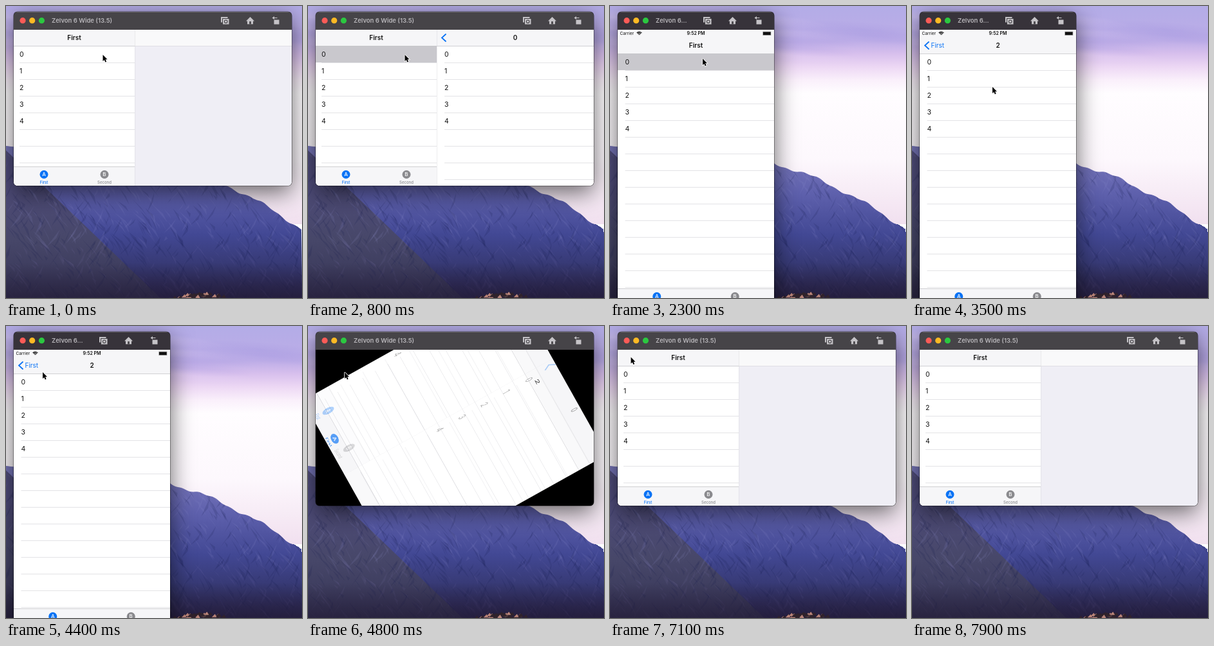
An HTML page with a canvas that plays this animation: 460x455 px, repeating every 8000 ms.

```html
<!DOCTYPE html>
<html lang="en">
<head>
<meta charset="utf-8">
<title>Split view rotation</title>
<style>
html, body { margin: 0; width: 100%; height: 100%; overflow: hidden; background: #fff; }
canvas { display: block; }
</style>
</head>
<body>
<canvas id="stage" width="460" height="455"></canvas>
<script>
const W = 460, H = 455, LOOP = 8000, STEP = 100, ROW = 26;
const TO_PORTRAIT = 1170, TO_LANDSCAPE = 4640, TURN = 420;
const TAP = { root: 200, row: 2700, back: 6100 };
// drift: how far bars and lists slide while the device turns
const LAND = { w: 432, h: 243, col: 188, nav: 25, titleY: 12.5, inset: 9, tabY: 213, drift: -6 };
const PORT = { w: 243, h: 432, col: 243, nav: 37, titleY: 24.5, inset: 11.5, tabY: 403, drift: 20 };
const INK = '#111', BLUE = '#0a73f5', GREY = '#8a8a8e', LINE = '#dcdce0', EDGE = '#c6c6ca', BAR = '#f6f6f8';
// pointer: [departure time, x, y]
const STOPS = [[0, 150.5, 76], [1900, 144, 82], [2400, 130, 132], [3150, 125, 126], [4000, 57, 72], [5700, 32.5, 48.5]];

let c = document.getElementById('stage').getContext('2d');

const mix = (a, b, p) => a + (b - a) * p;
const ease = v => { v = Math.max(0, Math.min(1, v)); return v * v * (3 - 2 * v); };

function box(x, y, w, h, color) {
  c.fillStyle = color;
  c.fillRect(x, y, w, h);
}

function text(s, x, y, size, color, align = 'left', weight = 400) {
  c.font = `${weight} ${size}px Inter, "Liberation Sans", sans-serif`;
  c.textAlign = align;
  c.textBaseline = 'middle';
  c.fillStyle = color;
  c.fillText(s, x, y + .5);
}

const title = (s, x, y) => text(s, x, y, 10, INK, 'center', 600);

function path(points) {
  c.beginPath();
  points.forEach(([x, y]) => c.lineTo(x, y));
}

function shape(points, color) {
  path(points);
  c.fillStyle = color;
  c.fill();
}

function ink(color, width) {
  c.strokeStyle = color;
  c.lineWidth = width;
  c.stroke();
}

function arc(x, y, r, from = 0, to = 7) {
  c.beginPath();
  c.arc(x, y, r, from, to);
}

function disc(x, y, r, color) {
  arc(x, y, r);
  c.fillStyle = color;
  c.fill();
}

function saved(draw) {
  c.save();
  draw();
  c.restore();
}

const faded = (alpha, draw) => saved(() => { c.globalAlpha *= alpha; draw(); });

function ramp(y0, y1, stops) {
  const g = c.createLinearGradient(0, y0, 0, y1);
  stops.forEach(([at, color]) => g.addColorStop(at, color));
  return g;
}

// Runs a drawing into its own canvas.
function layer(w, h, scale, draw) {
  const cv = document.createElement('canvas'), before = c;
  cv.width = w * scale;
  cv.height = h * scale;
  c = cv.getContext('2d');
  c.scale(scale, scale);
  draw();
  c = before;
  return cv;
}

// ---------- wallpaper ----------
function ridge(x) {
  if (x < 255) return 218 + x * .106;
  const d = x - 255;
  return 245 + d * .3 + d * d * .001 + 2.5 * Math.sin(d / 13) + Math.sin(d / 4);
}

function wallpaper() {
  let seed = 11;
  const rnd = () => (seed = seed * 16807 % 2147483647) / 2147483647;

  box(0, 0, W, 340, ramp(0, 340, [[0, '#b3ace7'], [.16, '#bdade7'], [.22, '#d8c0ed'],
    [.28, '#edd8f4'], [.34, '#faf0fb'], [.4, '#fffdff'], [.7, '#fdf8fd'], [1, '#f1e0ef']]));
  for (let i = 0; i < 18; i++) saved(() => {
    c.translate(rnd() * W, rnd() * 90);
    c.rotate(.08);
    c.scale(1, .1);
    const g = c.createRadialGradient(0, 0, 0, 0, 0, 120), rgb = i % 2 ? '240,222,248' : '152,140,220';
    g.addColorStop(0, `rgba(${rgb},.22)`);
    g.addColorStop(1, `rgba(${rgb},0)`);
    disc(0, 0, 120, g);
  });

  saved(() => {
    const outline = [[W, H], [0, H]];
    for (let x = 0; x <= W; x += 3) outline.push([x, ridge(x)]);
    path(outline);
    c.clip();
    box(0, 210, W, 245, ramp(235, H, [[0, '#7776ba'], [.25, '#5f61ad'], [.55, '#424894'], [.8, '#35376f'], [1, '#2a2650']]));
    shape([[0, 225], [110, 330], [240, H], [0, H]], ramp(270, H, [[0, '#504d7c'], [.5, '#474769'], [1, '#353455']]));
    // rock faces: slivers running down the slopes
    for (let i = 0; i < 900; i++) {
      const x = rnd() * W, y = 225 + rnd() * 230, len = 8 + rnd() * 30;
      const a = rnd() < .7 ? .75 + rnd() * .4 : 1.9 + rnd() * .4;
      const dx = Math.cos(a) * len, dy = Math.sin(a) * len, dark = rnd() < .55;
      shape([[x, y], [x + dx, y + dy], [x + dx * .5 + 1 + rnd() * 4, y + dy * .5]],
        dark ? 'rgba(24,26,74,.16)' : `rgba(150,146,208,${y < 360 ? .13 : .07})`);
    }
    box(0, 400, W, 55, ramp(400, H, [[0, 'rgba(34,26,52,0)'], [1, 'rgba(34,26,52,.65)']]));
  });

  for (let i = 0; i < 60; i++) {
    const x = 260 + rnd() * 82, y = 446 + Math.abs(x - 302) * .14 + rnd() * 7;
    shape([[x - 3, y + 3], [x + 2, y - 2], [x + 5, y + 3]], i % 3 ? '#30232c' : '#b98478');
  }
}

// ---------- app screens ----------
function chevron(y) {
  c.lineCap = 'round';
  path([[14, y - 5.5], [8, y], [14, y + 5.5]]);
  ink(BLUE, 1.8);
}

function list(x, w, m, inset, selected = -1) {
  box(x, 0, w, m.h, '#fff');
  if (selected >= 0) box(x, m.nav + selected * ROW, w, ROW, '#c9c8cd');
  for (let y = m.nav + ROW; y < m.h; y += ROW) box(x + inset, y, w - inset, .8, LINE);
  for (let i = 0; i < 5; i++) text(i, x + inset, m.nav + (i + .5) * ROW, 10.5, INK);
}

function navBar(w, m) {
  box(0, -30, w, m.nav + 30, BAR);
  box(0, m.nav, w, .8, EDGE);
}

function statusBar() {
  text('Carrier', 3.5, 5.5, 6.6, INK);
  text('9:52 PM', 121.5, 5.5, 7, INK, 'center', 600);
  for (let r = 1.4; r < 6; r += 1.9) {
    arc(33.5, 8.5, r, -2.4, -.74);
    ink(INK, 1.2);
  }
  box(225.3, 2.8, 13, 6, '#999');
  box(226, 3.5, 11.6, 4.6, INK);
}

function tab(x, y, letter, label, color) {
  disc(x, y, 6.5, color);
  text(letter, x, y, 8, '#fff', 'center', 500);
  text(label, x, y + 12, 6, color, 'center', 500);
}

// push: 0 shows the root list, 1 the pushed one
function master(m, push, selected, pressed, drift) {
  const w = m.col, y = m.titleY;
  c.beginPath();
  c.rect(0, 0, w, m.h);
  c.clip();
  saved(() => {
    c.translate(0, drift);
    list(-.3 * push * w, w, m, m.inset, selected);
    if (push > 0) {
      box((1 - push) * w - 1, 0, 1, m.h, LINE);
      list((1 - push) * w, w, m, m.inset);
    }
    navBar(w, m);
    faded(1 - push, () => title('First', w / 2 - push * w * .35, y));
    faded(push, () => title('2', w * (1 - push / 2), y));
    faded(pressed ? push * .1 : push, () => {
      chevron(y);
      if (m === PORT) text('First', 17.5 + (1 - push) * 60, y, 10, BLUE);
    });
  });
  box(0, m.tabY, w, m.h - m.tabY, BAR);
  box(0, m.tabY, w, .8, EDGE);
  tab(w / 4, m.tabY + 12.5, 'A', 'First', BLUE);
  tab(w * 3 / 4, m.tabY + 12.5, 'B', 'Second', GREY);
}

function detail(m, filled, drift) {
  const w = m.w - m.col;
  c.translate(m.col, drift);
  if (filled) {
    list(0, w, m, 12);
    navBar(w, m);
    chevron(m.titleY);
    title('0', w / 2, m.titleY);
  } else {
    box(0, 0, w, m.h, '#efeef5');
    box(0, 0, w, m.nav, '#f9f9fa');
    box(0, m.nav, w, .8, LINE);
  }
  box(-.4, 0, .8, m.h, '#d2d2d6');
}

function screen(m, t, drift = 0) {
  const push = ease((t - TAP.row - 150) / 400) - ease((t - TAP.back - 150) / 400);
  const selected = t < TAP.root + 200 || t > 3600 ? -1 : t < TAP.row + 50 ? 0 : 2;
  box(0, 0, m.w, m.h, '#fff');
  if (m === LAND) saved(() => detail(m, t >= TAP.root + 300 && t < TAP.back + 400, drift));
  saved(() => master(m, push, selected, t >= TAP.back, drift));
  if (m === PORT && t < TO_LANDSCAPE) statusBar();
}

// Both layouts are stretched to one changing size, turned and cross-faded.
function turning(from, to, p, sign, t) {
  const w = mix(from.w, to.w, p), h = mix(from.h, to.h, p);
  box(0, 0, to.w, to.h, '#000');
  c.translate(to.w / 2, to.h / 2);
  c.rotate(sign * (1 - p) * Math.PI / 2);
  [[from, 1], [to, p]].forEach(([m, alpha]) => faded(alpha, () =>
    c.drawImage(layer(m.w, m.h, 2, () => screen(m, t, m.drift)), -w / 2, -h / 2, w, h)));
}

// ---------- window ----------
function toolIcons(right) {
  const light = '#c5c3c7', dark = '#434145';
  saved(() => {
    c.translate(right - 104, 23);
    box(-6, -6, 10.5, 8.5, light);
    box(-4, -4, 11, 10, dark);
    box(-3, -3, 9.5, 8.5, light);
    disc(1.7, 1.3, 2.8, dark);
    disc(1.7, 1.3, 1.7, light);
    c.translate(39.5, 0);
    shape([[-6.5, .5], [0, -6], [6.5, .5]], light);
    box(-4.5, 0, 9, 5.3, light);
    box(-1.3, 1, 2.6, 4.3, dark);
    c.translate(40, 0);
    box(-3, -1.5, 8, 7, light);
    box(-4.5, -5, 6.5, 1, light);
    shape([[-2.5, -7], [-2.5, -2], [-6, -4.5]], light);
  });
}

function appWindow(m, content) {
  c.beginPath();
  c.roundRect(12, 9, m.w, m.h + 28, 6);
  saved(() => {
    c.shadowColor = 'rgba(0,0,0,.6)';
    c.shadowBlur = 36;
    c.shadowOffsetY = 10;
    c.fillStyle = '#333';
    c.fill();
  });
  ink('rgba(0,0,0,.6)', 1.2);
  saved(() => {
    c.clip();
    box(12, 9, m.w, 28, m === LAND ? '#464448' : '#37333a');
    box(12, 9, m.w, .8, 'rgba(255,255,255,.25)');
    ['#fc5b57', '#fdb924', '#2bc840'].forEach((color, i) => disc(26 + i * 14.7, 22.7, 4.6, color));
    text(m === LAND ? 'Zelvon 6 Wide (13.5)' : 'Zelvon 6...', 71, 22.7, 9.5, '#b8b6ba', 'left', 600);
    toolIcons(12 + m.w);
    c.translate(12, 37);
    c.beginPath();
    c.rect(0, 0, m.w, m.h);
    c.clip();
    content();
  });
}

function pointer(t) {
  if (t >= 7300) return;
  const i = STOPS.findLastIndex(s => s[0] <= t);
  const [t0, x1, y1] = STOPS[i], [, x0, y0] = STOPS[Math.max(0, i - 1)];
  const p = ease((t - t0) / 300);
  c.translate(mix(x0, x1, p), mix(y0, y1, p));
  if (Object.values(TAP).some(k => t >= k && t < k + 250)) {
    disc(0, 0, 15.5, 'rgba(150,150,154,.4)');
    arc(0, 0, 15.3);
    ink('#fff', 3);
    ink('#1a1a1e', 1.4);
  }
  path([[0, 0], [0, 10], [2.3, 8], [3.8, 11.6], [5.6, 10.8], [4.1, 7.3], [7, 7.2], [0, 0]]);
  ink('#fff', 1.6);
  c.fillStyle = '#000';
  c.fill();
}

const backdrop = layer(W, H, 1, wallpaper);

function frame(now) {
  const t = Math.floor(now % LOOP / STEP) * STEP;
  const portrait = t >= TO_PORTRAIT && t < TO_LANDSCAPE;
  const [m, other] = portrait ? [PORT, LAND] : [LAND, PORT];
  const since = t - (portrait ? TO_PORTRAIT : TO_LANDSCAPE);
  c.drawImage(backdrop, 0, 0);
  appWindow(m, () => {
    if (since >= 0 && since < TURN) turning(other, m, ease(since / TURN), portrait ? -1 : 1, t);
    else screen(m, t);
  });
  saved(() => pointer(t));
}

const start = performance.now();
function tick() {
  frame(performance.now() - start);
  requestAnimationFrame(tick);
}
tick();
</script>
</body>
</html>
```
